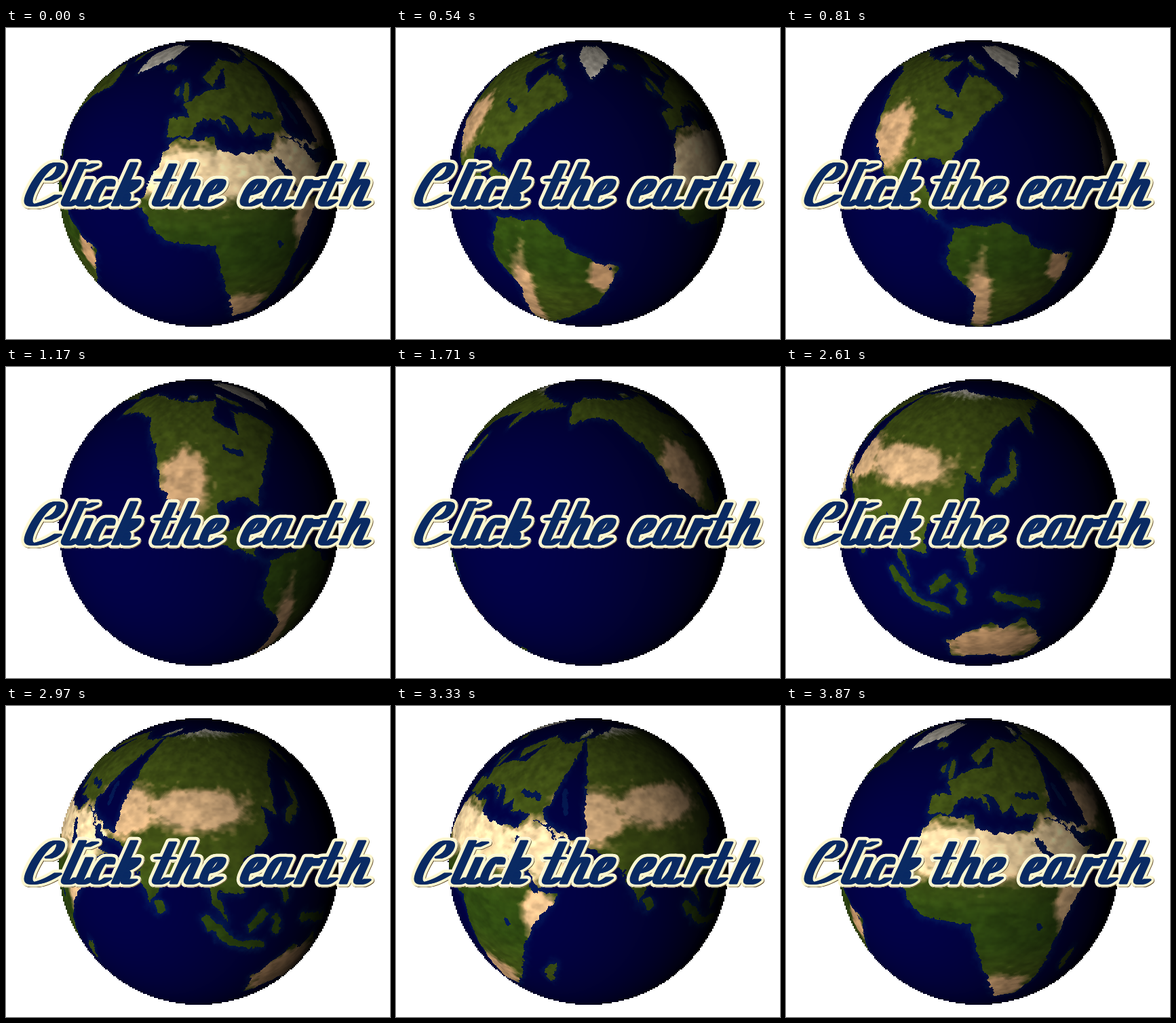
An HTML page with a canvas for the animation above (3.96 s loop, 566 px wide and 458 px high).

```html
<!DOCTYPE html>
<html lang="en">
<head>
<meta charset="utf-8">
<title>Click the earth</title>
<style>
  html, body { margin: 0; width: 100%; height: 100%; overflow: hidden; background: #fff; }
  canvas { display: block; width: 566px; height: 458px; }
</style>
</head>
<body>
<canvas id="stage" width="566" height="458" role="img" aria-label="Click the earth"></canvas>
<script>
const start = performance.now();
const W = 566, H = 458, STEP_MS = 90, STEPS = 44, START_LON = 3.8;
const GLOBE = { cx: 284, cy: 229, rx: 207, ry: 211, tilt: 22.5 * Math.PI / 180, distance: 4 };
const LIGHT = { x: -0.5, y: -0.12, z: 0.86 };
const SCALE = 4, MAP_W = 360 * SCALE, MAP_H = 180 * SCALE;

// Key points of the coasts in degrees; noise roughens them later.
const CONTINENTS = {
  africa: 'M-6 36L10 37 11 33 20 31 33 31 43 12 51 12 40 -4 35 -23 27 -34 19 -35 9 2 -8 4 -17 14 -10 30Z',
  arabia: 'M33 31L43 13 59 22 52 24 48 31 36 36Z',
  europe: 'M60 69L41 66 25 71 6 60 12 56 17 61 24 65 22 60 20 55 8 54 -4 48.5 -1 44 -9 43 -9 37 -1 37 6 43.5 12 43 17 38.5 13 45 19 42 22 37 26 40 28 37 36 36 60 28Z',
  asia: 'M58 69L73 72 104 77 140 72 190 66 163 60 156 51 155 59 137 54 128 41 127 35 121 39 121 29 108 21 109 12 100 13 103 2 98 10 97 17 91 22 80 14 77.5 8 73 19 66 25 56 27 48 30 42 37Z',
  northAmerica: 'M-166 66L-156 71 -110 68 -85 69 -94 60 -81 52 -77 62 -64 59 -56 52 -68 45 -76 36 -81 26 -85 30 -96 28 -95 19 -88 21 -83 10 -79 8 -95 16 -106 22 -117 33 -124 46 -135 58 -150 60 -163 56Z',
  southAmerica: 'M-78 8L-62 10.5 -50 0 -35 -7 -41 -22 -55 -35 -66 -45 -70 -54 -74 -45 -71 -18 -81 -5Z',
  greenland: 'M-60 82L-22 82 -22 71 -44 60 -54 70Z',
  australia: 'M114 -23L130 -13 136 -16 142 -11 153 -27 148 -38 131 -32 115 -34Z',
  madagascar: 'M50 -13L47 -25 44 -20Z'
};
const ISLANDS = 'M132 33L140 37 142 44M96 4L105 -5 115 -8M133 -2L147 -7M112 0L116 4M121 -3L121 1M121 17L125 8M-3 51L-4 57M-8 53V54M-83 22L-70 19M-80 72L-67 65M-112 71H-105M54 71L66 76M-22 65H-16M81 7V8M176 -38L169 -45';
const INLAND_SEAS = 'M30 43.5L39 42.5M50 45L51.5 38M60 45V45.5M-90 47L-83 44M33 -1V-0.5M34 28L43 12M50 29L55 26';

// Dry land as soft spots; sun bleaches it from tan to sand.
const dry = (lon, lat, rx, ry, sun) => ({ lon, lat, rx, ry, sun });
const DRY = [
  dry(8, 25, 36, 10, 1), dry(44, 25, 16, 11, 1), dry(60, 37, 17, 10, 0.35),
  dry(92, 39, 24, 8, 0.35), dry(-109, 35, 10, 12, 0.2), dry(-70, -25, 5, 24, 0.1),
  dry(21, -28, 10, 9, 0.1), dry(45, 4, 7, 9, 0.4), dry(132, -25, 22, 11, 0), dry(-41, -9, 5, 7, 0)
];
const GREEN = [66, 82, 22], JUNGLE = [44, 68, 16], TAN = [192, 148, 104];
const SAND = [243, 213, 162], SNOW = [205, 198, 184], OCEAN = [2, 2, 64], SHELF = [6, 50, 100];

const clamp = v => Math.max(0, Math.min(1, v));
const ramp = (from, to, v) => clamp((v - from) / (to - from));
const mix = (a, b, k) => a.map((v, i) => v + (b[i] - v) * k);

const hash = (x, y) => {
  let h = Math.imul(x, 374761393) + Math.imul(y, 668265263);
  h = Math.imul(h ^ (h >>> 13), 1274126177);
  return ((h ^ (h >>> 16)) >>> 0) / 4294967296;
};
function valueNoise(x, y) {
  const ix = Math.floor(x), iy = Math.floor(y);
  let fx = x - ix, fy = y - iy;
  fx *= fx * (3 - 2 * fx);
  fy *= fy * (3 - 2 * fy);
  const top = hash(ix, iy) * (1 - fx) + hash(ix + 1, iy) * fx;
  const low = hash(ix, iy + 1) * (1 - fx) + hash(ix + 1, iy + 1) * fx;
  return top * (1 - fy) + low * fy;
}
const fractal = (x, y) => (valueNoise(x, y) * 2 + valueNoise(x * 2.3 + 9, y * 2.3 + 5)) / 3 - 0.5;

function makeCanvas(w, h) {
  const canvas = document.createElement('canvas');
  canvas.width = w;
  canvas.height = h;
  return canvas.getContext('2d', { willReadFrequently: true });
}

// Blue marks shallow water, green marks land.
function paintMask() {
  const c = makeCanvas(MAP_W, MAP_H);
  const coasts = new Path2D(Object.values(CONTINENTS).join(''));
  const islands = new Path2D(ISLANDS), seas = new Path2D(INLAND_SEAS);
  const stroke = (path, color, width) => {
    c.strokeStyle = color;
    c.lineWidth = width;
    c.stroke(path);
  };
  c.fillRect(0, 0, MAP_W, MAP_H);
  c.lineCap = c.lineJoin = 'round';
  const onMap = paint => {
    for (const turn of [0, -360]) {
      c.setTransform(SCALE, 0, 0, -SCALE, MAP_W / 2 + turn * SCALE, MAP_H / 2);
      paint();
    }
  };
  c.filter = 'blur(4px)';
  onMap(() => {
    stroke(coasts, '#009', 1.6);
    stroke(islands, '#00b', 4.5);
  });
  c.filter = 'none';
  onMap(() => {
    c.fillStyle = '#0f0';
    c.fill(coasts);
    stroke(islands, '#0f0', 3);
    stroke(seas, '#007', 2.2);
  });
  return c.getImageData(0, 0, MAP_W, MAP_H).data;
}

function groundColor(lon, lat, grain) {
  let aridity = 0, sun = 0;
  for (const d of DRY) {
    const x = (lon - d.lon) / d.rx, y = (lat - d.lat) / d.ry;
    const k = Math.exp(-x * x - y * y);
    aridity = Math.max(aridity, k);
    sun = Math.max(sun, d.sun * ramp(0.3, 0.6, k));
  }
  const plants = mix(GREEN, JUNGLE, ramp(22, 6, Math.abs(lat)));
  const soil = mix(plants, mix(TAN, SAND, sun), ramp(0.25, 0.6, aridity + grain * 0.4));
  const snowLine = 72 - 15 * Math.exp(-(((lon + 42) / 16) ** 2));
  return mix(soil, SNOW, ramp(-2, 4, lat - snowLine + grain * 6));
}

function paintMap() {
  const mask = paintMask(), map = new Uint8ClampedArray(mask.length);
  for (let y = 0, o = 0; y < MAP_H; y++) {
    for (let x = 0; x < MAP_W; x++, o += 4) {
      const dx = Math.round(10 * fractal(x / 9, y / 9));
      const dy = Math.round(10 * fractal(x / 9 + 70, y / 9 + 30));
      const row = Math.min(MAP_H - 1, Math.max(0, y + dy));
      const s = (row * MAP_W + (x + dx + MAP_W) % MAP_W) * 4;
      let color;
      if (mask[s + 1] > 128) {
        const grain = fractal(x / 14 + 40, y / 9);
        color = groundColor(x / SCALE - 180, 90 - y / SCALE, grain).map(v => v * (1 + 0.4 * grain));
      } else {
        color = mix(OCEAN, SHELF, mask[s + 2] / 255);
      }
      map.set(color, o);
    }
  }
  return map;
}

// For every visible pixel: its place on the stage, map row, map column and light.
function traceGlobe() {
  const { cx, cy, rx, ry, tilt, distance: d } = GLOBE;
  const k2 = 1 / (d * d - 1), k = Math.sqrt(k2);
  const sin = Math.sin(tilt), cos = Math.cos(tilt), deg = 180 / Math.PI;
  const rays = [];
  for (let y = 0; y < H; y++) {
    for (let x = 0; x < W; x++) {
      const edgeX = ((x & ~1) + 1 - cx) / rx, edgeY = ((y & ~1) + 1 - cy) / ry;
      if (edgeX * edgeX + edgeY * edgeY > 1) continue;
      const u = (x + 0.5 - cx) / rx, v = (cy - y - 0.5) / ry;
      const a = 1 + (u * u + v * v) * k2;
      const t = (d - Math.sqrt(Math.max(0, d * d - a * (d * d - 1)))) / a;
      const nx = u * k * t, ny = v * k * t, nz = d - t;
      const up = Math.max(-1, Math.min(1, ny * cos + nz * sin));
      const lon = Math.atan2(nx, nz * cos - ny * sin) * deg;
      const row = Math.min(MAP_H - 1, Math.floor((90 - Math.asin(up) * deg) * SCALE));
      const light = 0.03 + 1.12 * Math.max(0, LIGHT.x * nx + LIGHT.y * ny + LIGHT.z * nz);
      rays.push({ at: (y * W + x) * 4, row: row * MAP_W, col: (lon + 180) * SCALE, light });
    }
  }
  return rays;
}

// Upright pen strokes on a baseline at y = 0; slant and a level nib make the script.
const stem = (x, height) => `M${x} ${-height}V-8q0 8 6 8q5 0 10-7`;
const GLYPHS = {
  C: 'M18-38q12-4 10-16q-2-8-10-7C5-59 0-36 0-20C0-6 4 0 12 0Q26 0 42-14',
  l: stem(0, 62),
  i: stem(0, 37) + 'M-11-55l9-5',
  c: 'M15-29q0-8-6-8C1-37 0-24 0-15Q0 0 9 0q6 0 12-7',
  k: 'M0-62V0M2-18C14-22 20-30 16-36q-5-3-12 10M4-18q8 0 8 10q0 8 5 8q4 0 8-5',
  t: stem(0, 60) + 'M-12-37H10',
  h: 'M0-62V0M0-14C2-28 8-37 14-37q5 0 5 8V-8q0 8 6 8q4 0 8-5',
  e: 'M1-16q16-2 16-13q0-8-6-8C2-37 0-24 0-15Q0 0 10 0q7 0 14-8',
  a: 'M19-28q-2-9-9-9C2-37 0-24 0-14Q0 0 7 0Q15 0 19-16' + stem(19, 37),
  r: 'M0-37V0M0-14Q4-37 14-35q4 2 1 8'
};
const WORDS = { Click: [28, 85, 106, 126, 161], the: [219, 247, 287], earth: [347, 381, 430, 464, 497] };
const BASELINE = 261, SLANT = 0.45, NIB = 5;

function paintLettering() {
  const c = makeCanvas(W, H), script = new Path2D();
  for (const [word, places] of Object.entries(WORDS)) {
    places.forEach((x, i) => {
      const glyph = new Path2D(GLYPHS[word[i]]);
      script.addPath(glyph, new DOMMatrix([1, 0, -SLANT, 1, x, BASELINE]));
    });
  }
  c.lineCap = c.lineJoin = 'round';
  const pass = (color, width, dx, dy) => {
    c.strokeStyle = color;
    c.lineWidth = width;
    for (let nib = -NIB; nib <= NIB; nib++) {
      c.setTransform(1, 0, 0, 1, nib + dx, dy);
      c.stroke(script);
    }
  };
  pass('#fffbe0', 12.5, 0, 0);
  pass('#6a5736', 10, 1, 1);
  pass('#fdf6cf', 10.5, 0, 0);
  pass('#0a2a63', 3, 0, 0);
  return c.canvas;
}

const ctx = document.getElementById('stage').getContext('2d');
const map = paintMap(), rays = traceGlobe(), lettering = paintLettering();
const picture = new ImageData(W, H);
picture.data.fill(255);
let shown = -1;

function draw(step) {
  const turn = (START_LON - step * 360 / STEPS) * SCALE + 2 * MAP_W;
  const px = picture.data;
  for (const { at, row, col, light } of rays) {
    const s = (row + Math.floor(col + turn) % MAP_W) * 4;
    for (let k = 0; k < 3; k++) px[at + k] = map[s + k] * light;
  }
  ctx.putImageData(picture, 0, 0);
  ctx.drawImage(lettering, 0, 0);
}

function tick() {
  const step = Math.floor((performance.now() - start) / STEP_MS) % STEPS;
  if (step !== shown) draw(shown = step);
  requestAnimationFrame(tick);
}
draw(shown = 0);
requestAnimationFrame(tick);
</script>
</body>
</html>
```
